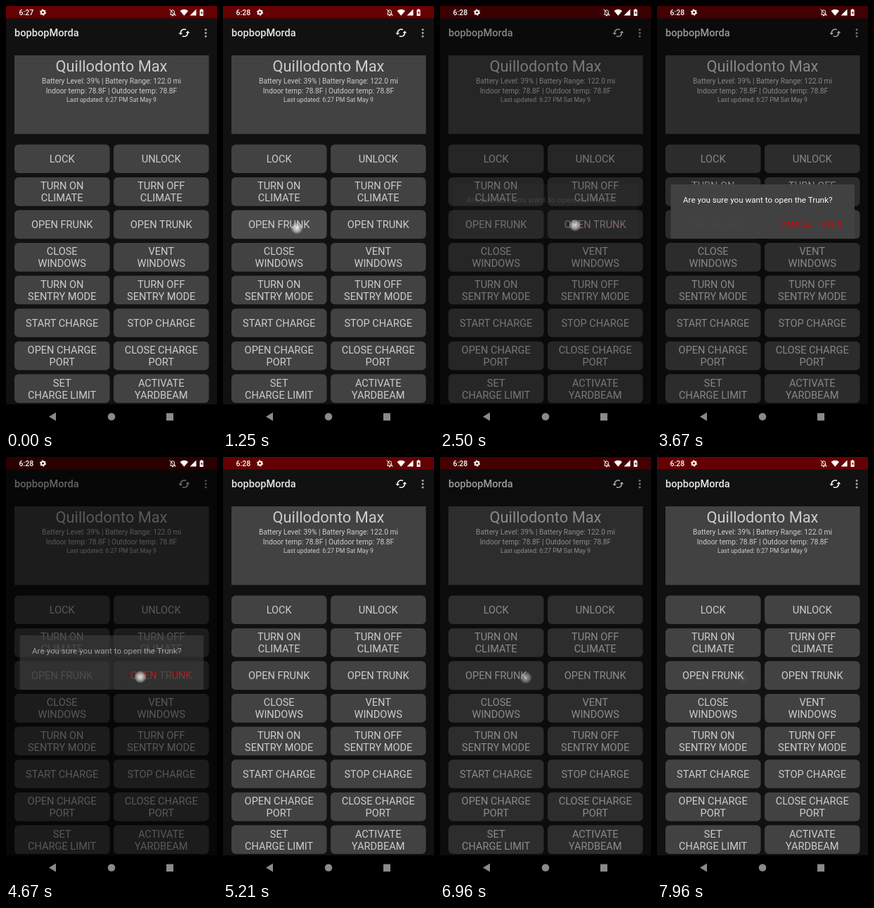
An HTML page for the animation above (8 s loop, 300 by 600 pixels).

```html
<!DOCTYPE html>
<html lang="en">
<head>
<meta charset="utf-8">
<title>Car remote</title>
<style>
html, body { margin: 0; width: 100%; height: 100%; overflow: hidden; background: #000; }
svg { display: block; width: 100vw; height: 100vh; font-family: Roboto, "Noto Sans", sans-serif; }
.medium { font-weight: 500; }
.action { font-weight: 500; font-size: 10.2px; letter-spacing: .91px; fill: #d00404; }
</style>
</head>
<body>
<svg id="stage" viewBox="0 0 300 600">
  <defs>
    <radialGradient id="spot">
      <stop offset="0" stop-color="#fff" stop-opacity=".85"/>
      <stop offset=".45" stop-color="#ddd" stop-opacity=".72"/>
      <stop offset=".75" stop-color="#bbb" stop-opacity=".5"/>
      <stop offset="1" stop-color="#999" stop-opacity="0"/>
    </radialGradient>
  </defs>
  <rect width="300" height="565" fill="#111"/>
  <rect width="300" height="17.5" fill="#650003"/>
  <g id="app">
    <!-- toolbar: refresh and menu -->
    <g id="refresh" fill="#fff" transform="translate(253.3 38.2) scale(.728)">
      <path id="arrow" d="M7-4L3 0H6A6 6 0 0 1-2.800 5.300L-4.260 6.760A8 8 0 0 0 8 0H11z"/>
      <use href="#arrow" transform="rotate(180)"/>
    </g>
    <g fill="#aaa">
      <circle cx="284" cy="33.500" r="1.500"/>
      <circle cx="284" cy="38.200" r="1.500"/>
      <circle cx="284" cy="42.900" r="1.500"/>
    </g>
    <rect x="12" y="70" width="276.500" height="111.500" fill="#424242"/>
  </g>
  <g id="overlay"></g>
  <!-- status icons -->
  <g id="status" fill="#fff">
    <circle cx="52.500" cy="9" r="2.500" fill="none" stroke="#fff" stroke-width="2"/>
    <circle cx="52.500" cy="9" r="3.800" fill="none" stroke="#fff" stroke-width="1.400" stroke-dasharray="2 1.980"/>
    <path d="M233.500 12.200h7l-1-1.500V8.300a2.500 2.500 0 0 0-5 0v2.400zM236 13h2a1 1 0 0 1-2 0z" fill="none" stroke="#fff"/>
    <path d="M232.500 4.500l9 9.500" stroke="#fff"/>
    <path d="M247.500 7a8.500 8.500 0 0 1 11.500 0l-5.750 6.800z"/>
    <path d="M270.500 4.500v9h-9z"/>
    <path d="M276.900 4.200h2.200v1h1.400v8.800h-5V5.200h1.400z"/>
    <path d="M278.500 6.800l-1.700 3.200h1.200v2.400l1.700-3.300h-1.200z" fill="#650003"/>
  </g>
  <!-- navigation bar -->
  <rect y="565" width="300" height="35"/>
  <g fill="#8a8a8a">
    <path d="M61 582.500l10-6v12z"/>
    <circle cx="150" cy="582.500" r="5.300"/>
    <rect x="228" y="577.500" width="10" height="10.500"/>
  </g>
  <g id="touches"></g>
</svg>
<script>
const LOOP = 8000;
const $ = id => document.getElementById(id);

function add(parent, tag, attrs, text) {
  const el = document.createElementNS('http://www.w3.org/2000/svg', tag);
  for (const k in attrs) el.setAttribute(k, attrs[k]);
  if (text) el.textContent = text;
  parent.appendChild(el);
  return el;
}

const label = (parent, str, x, y, size, fill, more) =>
  add(parent, 'text', { x, y, 'font-size': size, fill, ...more }, str);
const mid = { 'text-anchor': 'middle' };

// Opacity track from [time, value] pairs
function track(el, steps) {
  const all = [[0, steps[0][1]], ...steps, [LOOP, steps[steps.length - 1][1]]];
  el.animate(all.map(([t, opacity]) => ({ offset: t / LOOP, opacity })),
    { duration: LOOP, iterations: Infinity });
}

const app = $('app'), overlay = $('overlay');
label(app, 'bopbopMorda', 12, 43.4, 14.57, '#e4e4e4', { class: 'medium' });
[['Quillodonto Max', 93, 21.85], ['Battery Level: 39% | Battery Range: 122.0 mi', 109.8, 10.2],
 ['Indoor temp: 78.8F | Outdoor temp: 78.8F', 123.6, 10.2],
 ['Last updated: 6:27 PM Sat May 9', 135.7, 8.74]]
  .forEach(([s, y, size]) => label(app, s, 150, y, size, '#ccc', mid));

const names = ['LOCK', 'UNLOCK', 'TURN ON/CLIMATE', 'TURN OFF/CLIMATE', 'OPEN FRUNK', 'OPEN TRUNK',
  'CLOSE/WINDOWS', 'VENT/WINDOWS', 'TURN ON/SENTRY MODE', 'TURN OFF/SENTRY MODE',
  'START CHARGE', 'STOP CHARGE', 'OPEN CHARGE/PORT', 'CLOSE CHARGE/PORT',
  'SET/CHARGE LIMIT', 'ACTIVATE/YARDBEAM'];
const ripples = names.map((name, i) => {
  const x = i % 2 ? 153 : 12, y = 196.4 + 46.55 * (i >> 1);
  const box = { x, y, width: 135.5, height: 40.7, rx: 6 };
  add(app, 'rect', { ...box, fill: '#424242' });
  const ripple = add(app, 'rect', { ...box, fill: '#fff', opacity: 0 });
  const lines = name.split('/');
  lines.forEach((s, n) =>
    label(app, s, x + 67.7, y + 25.8 + 17 * (n - (lines.length - 1) / 2), 14.57, '#ccc', mid));
  return ripple;
});

function touch(x, y, from, to, rest = 0) {
  const dot = add($('touches'), 'circle', { cx: x, cy: y, r: 9, fill: 'url(#spot)' });
  track(dot, [[from, 0], [from + 50, 1], [to, 1], [to + 130, rest]]);
}

const dialogs = [
  { btn: 4, open: 1330, close: 2370, ask: 'open the Frunk', ok: 'OPEN', cancelX: 176, okX: 233.5,
    tap: [105, 315], dismiss: [192, 311] },
  { btn: 5, open: 3480, close: 4610, ask: 'open the Trunk', ok: 'OPEN', cancelX: 176, okX: 233.5,
    tap: [212, 313], dismiss: [191, 312] },
  { btn: 15, open: 5690, close: 6790, ask: 'trigger Yardbeam', ok: 'ACTIVATE YARDBEAM', cancelX: 96, okX: 151.5,
    tap: [218, 543], dismiss: [122, 313], rest: .06 }
];

dialogs.forEach(({ btn, open, close, ask, ok, cancelX, okX, tap, dismiss, rest }) => {
  const dim = add(overlay, 'rect', { width: 300, height: 565 });
  track(dim, [[open, 0], [open + 190, .34], [open + 400, .57], [close + 70, .57], [close + 300, 0]]);

  const box = add(overlay, 'g', {});
  add(box, 'rect', { x: 19.5, y: 253, width: 261.5, height: 77, rx: 2, fill: '#424242' });
  label(box, `Are you sure you want to ${ask}?`, 37, 279, 11.65, '#fff');
  add(box, 'text', { x: cancelX, y: 313, class: 'action' }, 'CANCEL');
  add(box, 'text', { x: okX, y: 313, class: 'action' }, ok);
  track(box, [[open, 0], [open + 150, .97], [close, .97], [close + 150, 0]]);

  track(ripples[btn], [[open - 110, 0], [open - 20, .14], [open + 190, .12], [open + 450, 0]]);
  touch(...tap, open - 170, open);
  touch(...dismiss, close - 120, close + 120, rest);
});

// Clock
const tick = 600;
[['6:27', 1], ['6:28', 0]].forEach(([s, v]) => {
  const clock = label($('status'), s, 18.5, 12.8, 10.5, '#fff', { class: 'medium' });
  track(clock, [[tick, v], [tick, 1 - v]]);
});
</script>
</body>
</html>
```
